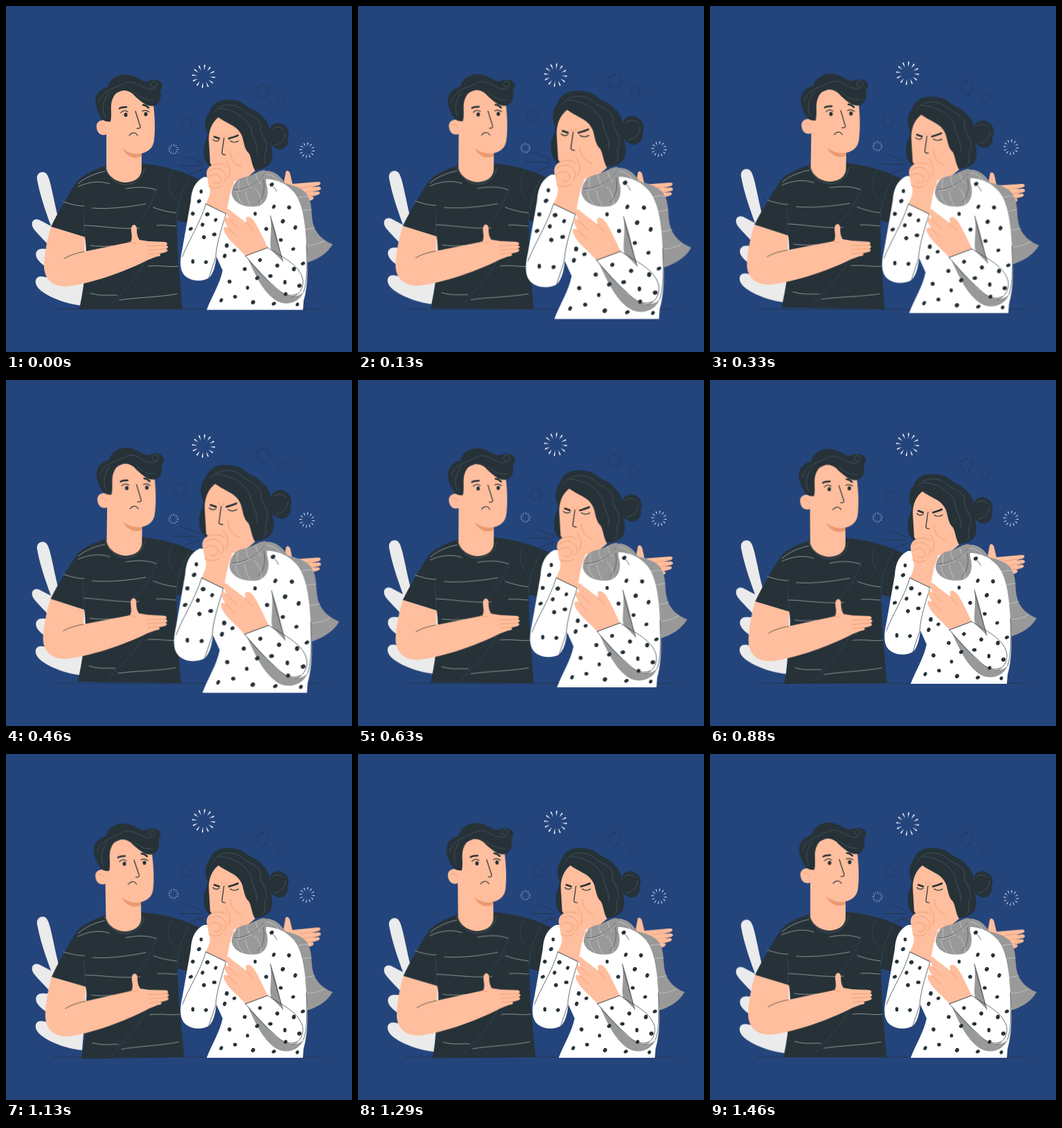
Animation of 500 by 500 pixels, one loop 1.5 s. Source, as an HTML page:

```html
<!DOCTYPE html>
<html lang="en">
<head>
<meta charset="utf-8">
<title>Coughing woman and worried man</title>
<style>
html, body { margin: 0; width: 100%; height: 100%; overflow: hidden; background: #24447c; }
svg { display: block; width: 100vw; height: 100vh; }
path, line { stroke-linecap: round; stroke-linejoin: round; }
.float { animation: float 1.5s linear infinite; }
.sway { animation: sway 1.5s linear infinite; transform-origin: 255px 270px; }
.cough { animation: cough 1.5s linear infinite; transform-origin: 362px 287.5px; }
@keyframes float { 50% { transform: translateY(-10px); } }
@keyframes sway {
  0%, 100% { transform: rotate(0deg); }
  25% { transform: rotate(1deg); }
  75% { transform: rotate(-1deg); }
}
@keyframes cough {
  0% { transform: scale(1); animation-timing-function: ease-out; }
  10% { transform: scale(1.09); animation-timing-function: ease-in; }
  17% { transform: scale(.98); animation-timing-function: ease-out; }
  33% { transform: scale(1.09); animation-timing-function: ease-in; }
  45%, 100% { transform: scale(1); }
}
.dark { fill: #263238; }
.skin { fill: #ffbe9d; }
.shade { fill: #eb996e; }
.white { fill: #fff; }
.grey { fill: #999; }
.leaf { fill: #ebebeb; }
.line { fill: none; stroke: #263238; stroke-width: .7; }
.ink { fill: none; stroke: #263238; stroke-width: 1.2; }
.brow { fill: none; stroke: #263238; stroke-width: 2.6; }
.fold { fill: none; stroke: #eb996e; stroke-width: .8; }
.hair { fill: none; stroke: #56646b; stroke-width: .6; }
.stripe { fill: none; stroke: #dfe3e4; stroke-width: .55; }
.seam { fill: none; stroke: #34495a; stroke-width: .8; }
</style>
</head>
<body>
<svg viewBox="0 0 500 500">
  <rect width="500" height="500" fill="#24447c"/>

  <g class="float">
    <path class="leaf" d="M45 251C43 242 52 237 58 242C65 249 68 280 78 316L118 336L110 433C88 431 58 420 47 408C39 399 43 389 53 391L70 394L74 384C62 381 50 373 45 365C40 356 46 349 56 351L66 351C58 341 47 331 40 322C34 313 40 306 48 309L65 318C57 296 49 273 45 251Z"/>
    <g id="light"></g>
  </g>

  <path class="line" d="M68 438.3H456"/>

  <g class="sway">
    <!-- hand on her shoulder -->
    <path class="skin" d="M404 242C404 236 410 237 411 244L414 257L451 254C455 254 456 257 452 259L442 262L452 261C456 262 456 265 453 266L443 269L451 268C455 269 454 272 450 273L441 276L444 276C446 279 442 281 436 282L408 284L400 262Z"/>
    <path class="fold" d="M425 263L451 259M428 270L452 266M430 276L448 273"/>

    <!-- shirt -->
    <path class="dark" d="M147 230C130 236 110 243 101 256C88 276 74 300 65 319L114 334C119 360 113 405 106 438H255C252 405 249 370 248 345L247 310L262 314L275 290L282 253C262 240 225 230 197 228Z"/>
    <path class="stripe" d="M104 261C120 254 135 252 150 257M173 264C190 261 205 261 217 266M83 283C95 287 105 289 113 289M125 292C150 294 180 290 202 286M213 291C225 296 238 298 246 299M113 317C140 318 165 323 193 321M218 317C230 316 239 318 246 318M122 346C140 349 160 346 178 344M206 376C222 374 237 378 249 376M122 374C136 377 145 374 160 373M122 415C138 420 148 417 160 418M164 425C190 421 220 421 247 416M104 257C112 249 130 241 143 239"/>
    <path class="seam" d="M219 262C210 286 204 300 185 316M202 367C190 395 168 412 150 434M240 239C232 252 233 268 245 280M112 296L113 330M264 250C254 268 247 285 247 308"/>

    <!-- neck and face -->
    <path class="skin" d="M145 175L145 235C148 247 160 255 174 255C188 254 196 246 196 236L196 213C206 211 213 204 214 194C216 178 215 160 213 142L182 116L150 130Z"/>
    <path class="shade" d="M168 206C178 213 187 215 196 213V217C184 223 174 216 168 206Z"/>
    <path class="skin" d="M148 167C139 162 129 167 131 176C132 186 141 189 148 184Z"/>
    <path class="fold" d="M135 173C138 170 142 172 144 177"/>
    <path class="line" d="M143 233C148 249 160 258 174 258C188 257 199 247 200 234" style="stroke:#56646b"/>

    <!-- hair -->
    <path class="dark" d="M151 167C145 168 139 165 137 161C133 154 128 144 129 136C130 126 137 119 147 117C149 106 160 99 172 99C183 99 191 105 200 109C207 109 211 105 217 107C226 108 229 116 223 122C225 132 223 140 215 144C204 147 194 137 187 131C178 120 162 118 155 132C149 143 154 156 151 167Z"/>
    <path class="hair" d="M134 140C137 123 157 119 175 110C190 108 197 121 211 120C220 118 220 108 213 109C207 111 209 117 214 117M143 160C137 148 141 134 149 126M187 125C196 134 204 137 214 136"/>

    <!-- features -->
    <path class="brow" d="M164 148C167 146 170 146 174 146M198 143C201 143 204 145 206 147"/>
    <path class="ink" d="M166 154C169 151 173 151 176 153M197 152C200 150 204 151 207 153"/>
    <ellipse class="dark" cx="173" cy="157.3" rx="2.5" ry="3"/>
    <ellipse class="dark" cx="202" cy="156.3" rx="2.5" ry="3"/>
    <path class="ink" d="M187 152L194 174C195 177 191 177 189 177M178 187C182 182 187 182 190 187"/>

    <!-- folded arm -->
    <path class="skin" d="M65 319L114 334L113 355L180 341C184 334 180 327 181 321C182 314 189 315 189 322C189 329 190 334 193 338L206 340L230 341C234 342 234 345 231 346C235 346 235 350 231 351C235 352 234 355 230 356L222 358C225 360 222 362 218 362L205 367C180 380 130 400 90 405C65 407 54 392 55 373C56 354 60 336 65 319Z"/>
    <path class="fold" d="M204 347L231 346M205 353L231 351M206 359L224 357M178 341L188 343"/>
    <path class="line" d="M84 365C94 359 103 357 113 355"/>
  </g>

  <g class="cough">
    <g id="black"></g>
    <path class="line" d="M260 217L285 227M251 230.500L284 231M266 243L285 236"/>

    <!-- scarf tail -->
    <path class="grey" d="M370 239C384 235 396 244 403 256C418 260 433 264 438 278C443 290 440 305 445 319C451 334 464 341 472 344C464 358 450 366 434 371L425 300L405 265L378 256Z"/>
    <path class="stripe" d="M376 243C385 243 393 250 398 258M418 278C425 276 432 274 438 276M425 297C431 296 436 294 441 294M430 323C436 323 441 322 446 320M435 346C445 346 453 343 460 339"/>

    <!-- hair and bun -->
    <path class="dark" d="M381 184C380 173 389 167 397 170C407 173 411 183 407 192C409 202 401 209 392 207C384 205 379 195 381 184Z"/>
    <path class="dark" d="M318 136C306 136 297 143 294 153C286 163 287 174 291 183C293 193 284 199 286 211C285 223 291 233 304 235L347 237C365 238 381 235 384 222C387 210 381 200 382 190C383 175 377 165 369 159C364 151 351 149 346 143C338 137 328 135 318 136Z"/>

    <!-- blouse -->
    <path class="white" d="M286 247C274 253 268 264 267 282L255 350C251 368 251 380 257 388C265 398 283 399 293 393C300 387 303 373 304 362L313 382C309 402 297 420 290 439H429L430 426C437 402 436 375 434 345C432 306 427 277 411 264C403 256 391 251 378 250L330 247Z"/>
    <path class="grey" d="M382 303C385 325 380 341 383 352L400 369C394 347 391 326 382 303Z"/>
    <path class="grey" d="M349 364C361 390 371 413 391 426C406 434 424 428 430 413C418 425 400 418 386 404C373 391 361 377 349 364Z"/>
    <g id="dots"></g>
    <path class="line" d="M289 286L318 300C310 326 304 345 303 363L293 393M289 286C280 315 263 340 255 362M346 361L378 349C397 362 425 373 429 396C430 408 423 418 413 420M346 361C359 377 374 393 387 404C400 418 410 420 420 416M382 303C388 330 395 350 400 369M381 257C386 260 389 263 391 268M434 345C435 371 436 396 430 413"/>

    <!-- face -->
    <path class="skin" d="M307 161C298 168 293 179 293 193L295 227L312 253H342L360 238C355 230 355 220 351 213C344 207 344 196 341 188C335 173 322 172 307 161Z"/>
    <path class="hair" d="M300 154C310 140 332 139 345 153C353 158 364 161 368 172C365 187 380 193 376 209C370 219 379 224 371 231M308 148C331 150 345 160 354 176C354 190 365 198 362 213M388 201C397 200 403 193 404 184M385 178C390 173 397 174 401 179"/>
    <path class="brow" d="M301 189L308 191.500M322 191.500C327 190 331 189 335 187"/>
    <path class="ink" d="M299 193C302 196 305 196 308 194M324 195C328 198 333 197 336 195M315 191L312 212C312 215 315 215 317 215"/>
    <path class="fold" d="M311 186L313 189M319 186L317 190M324 210C324 221 331 230 340 232"/>

    <!-- scarf -->
    <path class="grey" d="M326 271C327 258 333 249 346 247C358 244 365 237 374 237C378 244 374 252 377 260C380 274 376 285 365 289C348 292 329 287 326 271Z"/>
    <path class="stripe" d="M331 268C345 267 361 258 371 246M337 252C336 258 336 263 337 267M348 248C349 255 351 260 354 263M361 243C362 250 365 253 368 257M359 263C366 269 370 279 368 287M346 268C347 277 351 285 354 289M334 270C335 278 339 283 342 286"/>
    <path class="line" d="M330 266C345 266 363 257 372 244M372 251C375 265 371 278 364 284" opacity=".7"/>

    <!-- fist -->
    <path class="skin" d="M291 248C288 240 291 233 298 230C301 223 311 220 318 222C326 222 328 230 328 238C332 246 330 256 326 264C322 276 321 288 318 300L289 286C294 275 297 268 293 260Z"/>
    <path class="fold" d="M298 230C307 227 315 228 319 233M293 239C300 233 309 233 314 239M292 248C299 241 306 242 310 248M318 223C325 232 325 241 321 248M310 248C313 254 307 259 300 255M314 239C320 244 319 251 314 255M293 260C299 264 307 264 312 260"/>
    <path class="line" d="M289 286L318 300"/>

    <!-- hand on chest -->
    <path class="skin" d="M346 361C336 349 320 338 315 325C313 319 317 317 321 321L316 311C314 304 318 303 322 308L318 298C317 292 322 292 326 297L347 313C348 310 345 307 348 305C352 303 357 308 360 313C366 323 372 336 378 349Z"/>
    <path class="fold" d="M322 308L336 322M321 321L333 332M347 313L357 324"/>
    <path class="line" d="M346 361L378 349"/>
  </g>
</svg>
<script>
const NS = 'http://www.w3.org/2000/svg';
const add = (id, tag, attrs) => {
  const el = document.createElementNS(NS, tag);
  for (const key in attrs) el.setAttribute(key, attrs[key]);
  document.getElementById(id).append(el);
};

// A ring of tapered rays around x, y.
function burst(id, x, y, r, fill, n = 12) {
  const w = r * .055;
  for (let i = 0; i < n; i++) {
    add(id, 'path', {
      d: `M0 ${-r * .52}L${w} ${-r * .92}Q0 ${-r * 1.08} ${-w} ${-r * .92}Z`,
      transform: `translate(${x} ${y}) rotate(${i * 360 / n + 6})`,
      fill
    });
  }
}
burst('light', 285.5, 101.500, 17, '#fff');
burst('light', 242, 207, 7.5, '#ebebeb');
burst('light', 435, 208.5, 11.2, '#fff');
burst('black', 370.5, 123, 11, '#263238');
burst('black', 397.5, 137, 7.5, '#263238');
burst('black', 260.5, 169, 9.500, '#263238');

const dots = [
  [282, 268], [279, 282], [270, 300], [267, 322], [284, 316], [291, 301],
  [303, 309], [301, 330], [286, 334], [270, 369], [289, 370],
  [319, 346], [330, 353], [316, 361], [323, 398], [311, 425], [331, 420],
  [357, 428], [349, 407], [363, 393], [345, 380], [387, 430], [404, 416],
  [424, 404], [421, 431], [382, 390], [392, 375], [403, 399], [367, 367],
  [416, 380], [415, 351], [418, 320], [409, 291], [387, 290], [397, 338],
  [400, 311], [360, 300], [384, 258], [376, 322], [429, 372]
];
dots.forEach(([cx, cy], i) => add('dots', 'ellipse', {
  cx, cy,
  rx: 2.3 + i % 3 * .25,
  ry: 2.8 + i % 2 * .4,
  fill: '#263238',
  transform: `rotate(${i * 50 % 90} ${cx} ${cy})`
}));
</script>
</body>
</html>
```
